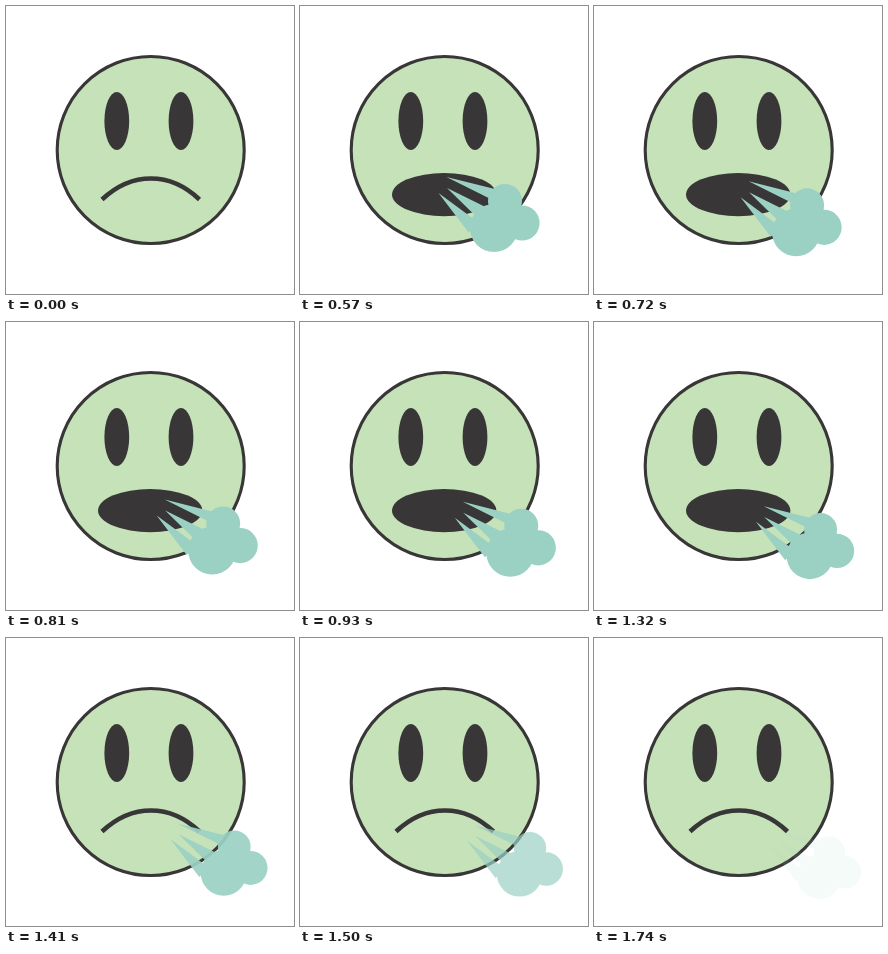
An HTML page with a canvas for the animation above (1.8 s loop, 288 px wide and 288 px high).

```html
<!DOCTYPE html>
<html lang="en">
<head>
<meta charset="utf-8">
<title>Coughing face</title>
<style>
html, body { margin: 0; width: 100%; height: 100%; overflow: hidden; background: #fff; }
canvas { display: block; width: 288px; height: 288px; }
</style>
</head>
<body>
<canvas id="stage" width="288" height="288"></canvas>
<script>
const canvas = document.getElementById('stage');
const ratio = window.devicePixelRatio || 1;
canvas.width = canvas.height = Math.round(288 * ratio);
const ctx = canvas.getContext('2d');

const LOOP = 1800, STEP = 30;
const COUGH = 570, SETTLE = 960, CLOSE = 1410, LAST = 1740;
const FADE_START = 1380, FADE_END = 1780;
const BURST = 16.8, DRIFT = 10.8, SHRINK = 0.08, EASE = 1.35;
const INK = '#383637', SKIN = '#c6e2b9', PUFF = '#9bd1c3';

const TAU = Math.PI * 2;
const clamp = v => Math.min(1, Math.max(0, v));
const progress = (t, from, to) => clamp((t - from) / (to - from));

function oval(x, y, rx, ry, color) {
  ctx.beginPath();
  ctx.ellipse(x, y, rx, ry, 0, 0, TAU);
  ctx.fillStyle = color;
  ctx.fill();
}

function outline(width) {
  ctx.lineWidth = width;
  ctx.strokeStyle = INK;
  ctx.stroke();
}

function drawFace(open) {
  oval(144.7, 144, 93.5, 93.5, SKIN);
  outline(3.1);
  for (const x of [110.8, 175]) oval(x, 115, 12.4, 29, INK);
  if (open) {
    oval(144.2, 188.6, 52.2, 21.6, INK);
  } else {
    ctx.beginPath();
    ctx.moveTo(96, 193.5);
    ctx.bezierCurveTo(126, 165.5, 164, 165.5, 193.5, 193.5);
    outline(4.6);
  }
}

// Triangle from a tip to a base of the given half width
function jet(x, y, bx, by, half) {
  const angle = Math.atan2(by - y, bx - x);
  const px = Math.sin(angle) * half, py = -Math.cos(angle) * half;
  ctx.moveTo(x, y);
  ctx.lineTo(bx + px, by + py);
  ctx.lineTo(bx - px, by - py);
  ctx.closePath();
}

function lobe(x, y, r) {
  ctx.moveTo(x + r, y);
  ctx.arc(x, y, r, 0, TAU);
}

function drawPuff(t) {
  // A quick burst that slows down, then a slow drift that gathers speed
  const burst = 1 - (1 - progress(t, COUGH, SETTLE)) ** EASE;
  const drift = progress(t, SETTLE, LAST) ** EASE;
  const dx = BURST * burst + DRIFT * drift;
  const scale = 1 - SHRINK * drift;

  ctx.save();
  ctx.globalAlpha = 1 - progress(t, FADE_START, FADE_END);
  ctx.translate(240 + dx, 246 + dx * 0.54);
  ctx.scale(scale, scale);
  ctx.translate(-240, -246);
  ctx.beginPath();
  jet(146.5, 171, 194, 188.5, 5.5);
  jet(147, 182, 183, 207.5, 7);
  jet(138.5, 187, 173.5, 221.5, 7);
  lobe(194, 222, 24);
  lobe(205, 195, 17);
  lobe(222, 217, 17.6);
  ctx.fillStyle = PUFF;
  ctx.fill();
  ctx.restore();
}

function draw(now) {
  const t = Math.min(Math.floor((now % LOOP) / STEP) * STEP, LAST);
  ctx.setTransform(ratio, 0, 0, ratio, 0, 0);
  ctx.fillStyle = '#fff';
  ctx.fillRect(0, 0, 288, 288);
  drawFace(t >= COUGH && t < CLOSE);
  if (t >= COUGH) drawPuff(t);
}

const start = performance.now();
function tick() {
  draw(performance.now() - start);
  requestAnimationFrame(tick);
}
tick();
</script>
</body>
</html>
```
